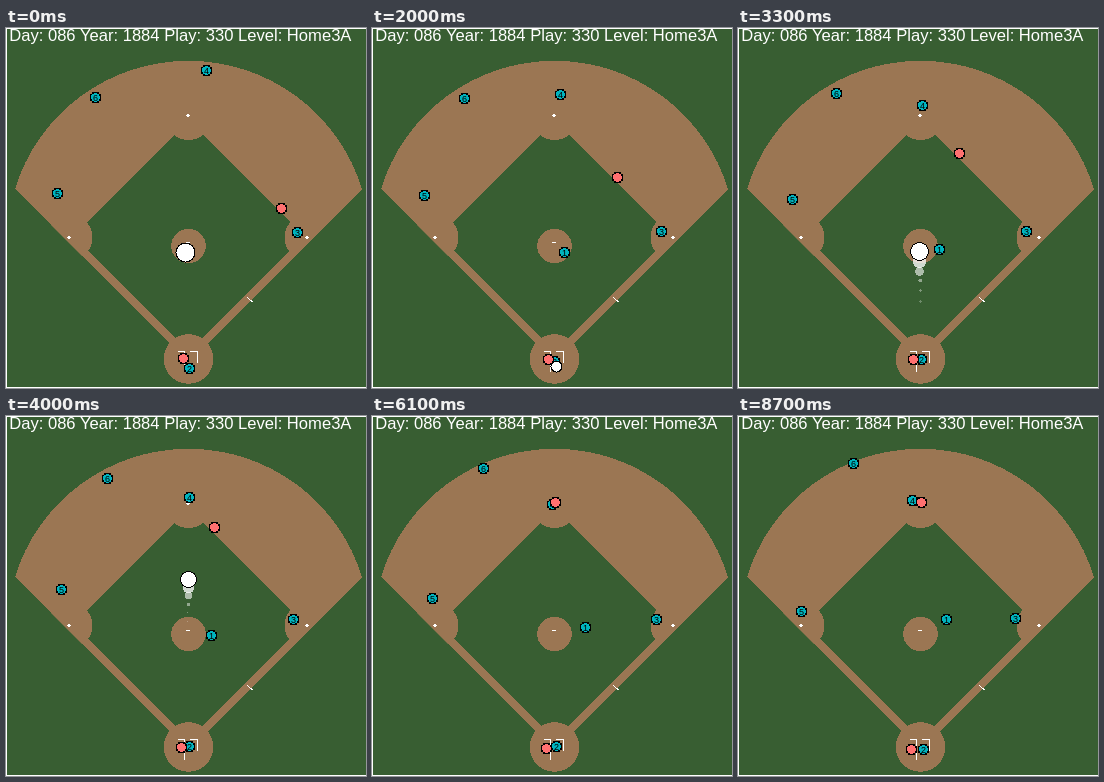
Write an HTML page that moves like this. It is 360 px wide and 360 px high and loops after 8.9 s.

```html
<!DOCTYPE html>
<html lang="en">
<head>
<meta charset="utf-8">
<title>Infield play</title>
<style>
  html, body { margin: 0; width: 100%; height: 100%; overflow: hidden; background: #fff; }
  svg { display: block; width: 100vw; height: 100vh; }
  svg :not(text) { shape-rendering: crispEdges; }
  text { font-family: "Liberation Sans", Arial, sans-serif; }
  .dirt { fill: #9b7653; }
  .grass { fill: #385e32; }
  .chalk { fill: none; stroke: #fff; }
  .man circle { stroke: #000; }
  .man text { font-size: 9px; text-anchor: middle; }
</style>
</head>
<body>
<svg id="stage" viewBox="0 0 360 360">
  <defs>
    <path id="fan" d="M182.5 334.5L9 161A181.5 181.500 0 0 1 356 161Z"/>
    <clipPath id="fair"><use href="#fan"/></clipPath>
  </defs>
  <rect class="grass" x="1" y="1" width="359" height="358"/>
  <use class="dirt" href="#fan"/>
  <path class="grass" d="M182.5 92.5L298 208L182.5 323.500L67 208Z"/>
  <g class="dirt">
    <g clip-path="url(#fair)">
      <circle cx="63.5" cy="209.5" r="23"/>
      <circle cx="301.5" cy="209.5" r="23"/>
    </g>
    <circle cx="182.5" cy="88" r="24"/>
    <circle cx="182.5" cy="218" r="17.3"/>
    <circle cx="182.5" cy="331" r="24.8"/>
  </g>
  <path fill="#fff" d="M61 209.5l2-2 2 2-2 2zM299 209.5l2-2 2 2-2 2zM180 87.5l2-2 2 2-2 2z"/>
  <path class="chalk" d="M180 214.5h4M241.5 269.5l5 4.500M172 323.500h6.500V344M184 323.500h7.500V335"/>
  <text x="3.2" y="13" font-size="16.6" fill="#fff">Day: 086 Year: 1884 Play: 330 Level: Home3A</text>
</svg>
<script>
const LOOP = 8900, STEP = 100, LAST = 8700;
const CYAN = '#00b4be', RED = '#ff7070';
const stage = document.getElementById('stage');

function add(parent, tag, attrs) {
  const el = document.createElementNS(stage.namespaceURI, tag);
  for (const k in attrs) el.setAttribute(k, attrs[k]);
  return parent.appendChild(el);
}

const clamp = u => Math.min(1, Math.max(0, u));

// Point at u on the Bezier curve with the given control points
function curve(points, u) {
  while (points.length > 1) {
    points = points.slice(1).map((q, i) => q.map((v, k) => points[i][k] + (v - points[i][k]) * u));
  }
  return points[0];
}

// A disc with a notched rim
function man(label, fill, points, end = LAST, power = 1) {
  const g = add(stage, 'g', { class: 'man' });
  add(g, 'circle', { r: 5, fill });
  add(g, 'circle', {
    r: 5.5, fill: 'none', pathLength: 16, 'stroke-dasharray': '1 1', 'stroke-dashoffset': -0.5
  });
  if (label) add(g, 'text', { y: 3.2 }).textContent = label;
  return { g, points, end, power };
}

const men = [
  man('1', CYAN, [[179, 224], [197, 230], [225, 209], [208, 203]]),
  man('2', CYAN, [[183, 340], [180, 328], [186, 327], [185, 333]]),
  man('3', CYAN, [[291, 204], [286, 203], [289, 203], [277, 202]]),
  man('4', CYAN, [[200, 42], [177, 83], [185, 96], [174, 84]]),
  man('5', CYAN, [[51, 165], [49, 165], [63, 180], [63, 195]]),
  man('6', CYAN, [[89, 69], [88, 79], [118, 43], [115, 47]]),
  man('', RED, [[275, 180], [183, 86]], 5250, 1.15),
  man('', RED, [[177, 330], [173, 333]])
];

// Flights of the ball as x, y, radius
const pitch = { from: 0, to: 850, points: [[179, 224, 9.5], [184, 338, 5.5]] };
const peg = { from: 2200, to: 5100, points: [[184, 338, 9.8], [177, 171.5, 9.5], [188, 87, 5.5]] };
const BALL_END = 5400;

function ballAt(t) {
  const { from, to, points } = t < peg.from ? pitch : peg;
  return curve(points, clamp((t - from) / (to - from)));
}

const dots = [];
for (let age = 5; age >= 0; age--) {
  const el = add(stage, 'circle', {
    fill: '#fff', opacity: 0.77 ** age, stroke: age ? 'none' : '#000'
  });
  dots.push({ age, el });
}

const snap = v => Math.round(v) + 0.5;

function draw(t) {
  for (const { g, points, end, power } of men) {
    const [x, y] = curve(points, clamp(t / end) ** power);
    g.setAttribute('transform', `translate(${snap(x)} ${snap(y)})`);
  }
  const radius = ballAt(t)[2];
  for (const { age, el } of dots) {
    const past = t - age * STEP;
    const shown = past >= 0 && t < BALL_END;
    el.setAttribute('visibility', shown ? 'visible' : 'hidden');
    const [x, y] = ballAt(past);
    el.setAttribute('cx', snap(x));
    el.setAttribute('cy', snap(y));
    el.setAttribute('r', radius * Math.max(0.12, 1 - age * 0.26));
  }
}

const start = performance.now();
function tick() {
  const t = (performance.now() - start) % LOOP;
  draw(Math.min(LAST, Math.floor(t / STEP) * STEP));
  requestAnimationFrame(tick);
}
tick();
</script>
</body>
</html>
```
